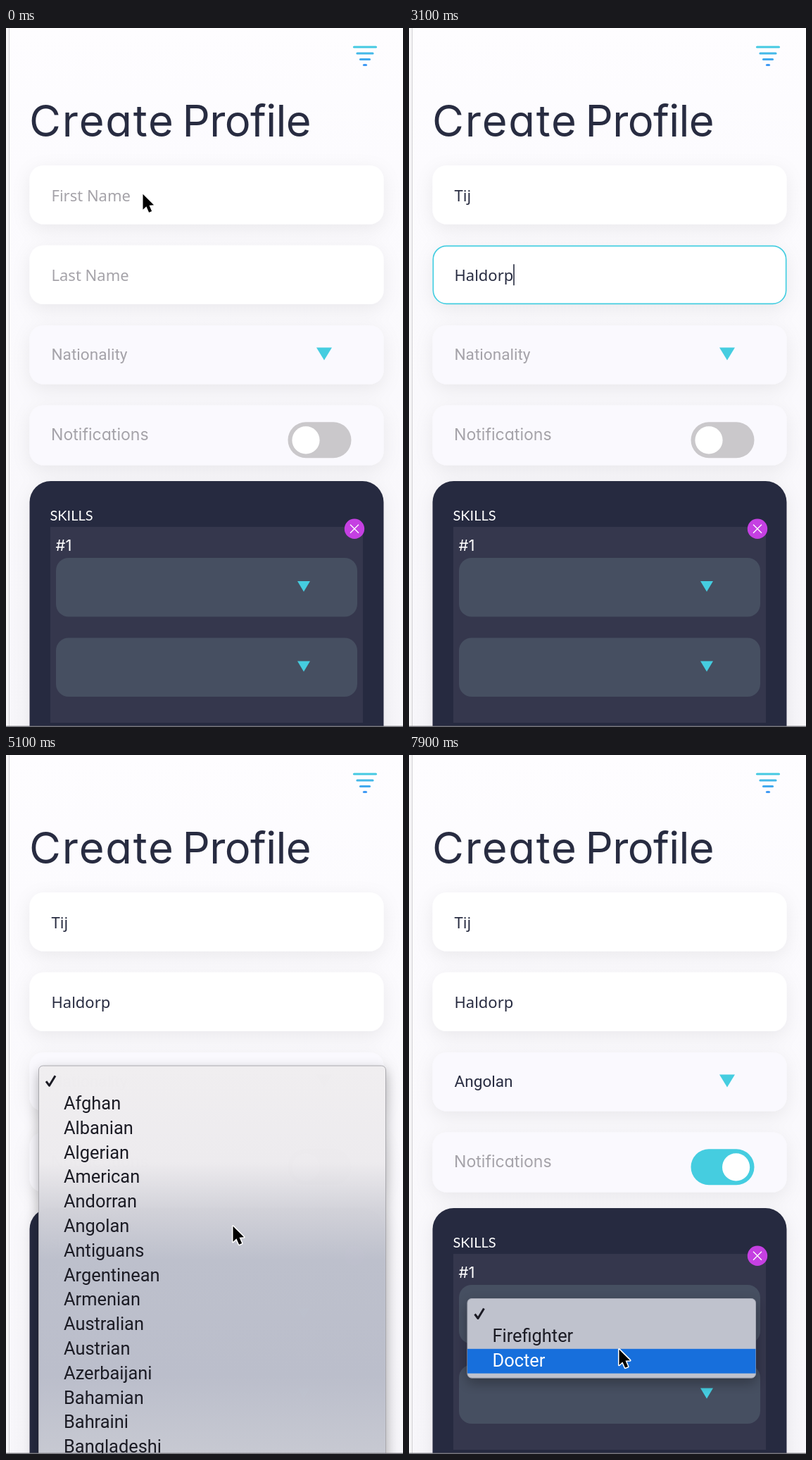
These frames come from a looping animation (564x992 px, 8 s). An HTML page:

```html
<!DOCTYPE html>
<html lang="en">
<head>
<meta charset="utf-8">
<title>Create Profile</title>
<style>
html, body { margin: 0; width: 100%; height: 100%; overflow: hidden; background: #fbfafd; }
svg { display: block; width: 564px; height: 992px; }
text { white-space: pre; }
.geo { font-family: Inter, sans-serif; font-feature-settings: "cv11"; font-optical-sizing: none; }
.title { font-size: 61.5px; }
.input { font: 22px "Noto Sans", sans-serif; }
.select { font: 22.6px Roboto, sans-serif; }
.popup { font: 22px Roboto, sans-serif; }
.menu { font: 25.4px Roboto, sans-serif; }
.label { font: 20px Lato, sans-serif; }
</style>
</head>
<body>
<svg id="stage" viewBox="0 0 564 992" xmlns="http://www.w3.org/2000/svg"></svg>
<script>
const LOOP = 8000, CYAN = '#45cde0', INK = '#282c41', GREY = '#a5a3a9';
const FIRST = 'Tij', LAST = 'Haldorp', NATION = 'Angolan';
const PITCH = 34.8;
const stage = document.getElementById('stage');
const $ = id => document.getElementById(id);

const rect = (x, y, w, h, r, fill, extra = '') =>
  `<rect x="${x}" y="${y}" width="${w}" height="${h}" rx="${r}" fill="${fill}" ${extra}/>`;
const text = (x, y, cls, fill, str, extra = '') =>
  `<text x="${x}" y="${y}" class="${cls}" fill="${fill}" ${extra}>${str}</text>`;
const arrow = (x, y, w, h) => `<path d="M${x} ${y}h${w}l${-w / 2} ${h}z" fill="${CYAN}"/>`;
const check = (x, y) =>
  `<path d="M${x - 6.5} ${y + 1}l4.5 6l8.5 -14" fill="none" stroke-width="3" stroke-linejoin="round"/>`;

const filterIcon = [[27, 494.5, 525.5], [36, 499, 521], [44.5, 503.5, 516.5], [52.5, 508.5, 511.5]]
  .map(([y, a, b]) => `<path d="M${a} ${y}H${b}"/>`).join('');

const fields = [[195, 83.5, '#fff'], [308.5, 83.5, '#fff'], [422, 83.5, '#faf9fe'], [535.5, 85, '#faf9fe']]
  .map(([y, h, fill]) => rect(33.5, y, 503, h, 20, fill)).join('');

const nations = ['', 'Afghan', 'Albanian', 'Algerian', 'American', 'Andorran', 'Angolan', 'Antiguans',
  'Argentinean', 'Armenian', 'Australian', 'Austrian', 'Azerbaijani', 'Bahamian', 'Bahraini', 'Bangladeshi'];
const jobs = ['', 'Firefighter', 'Docter'];

// "base" is the bottom edge of the empty first row of a menu.
function menuMarkup(id, items, x, y, w, h, base, fill, blue, edge) {
  return `<g id="${id}">
    ${rect(x, y, w, h, 6, fill, `stroke="${edge}" filter="url(#menuShadow)"`)}
    ${rect(x, 0, w, PITCH, 0, blue, 'class="bar"')}
    <g class="row">${check(x + 17, base - 15.5)}</g>
    ${items.slice(1).map((s, i) => text(x + 35.5, base + 25.3 + i * PITCH, 'menu row', '#1b1b24', s)).join('')}
  </g>`;
}

const popupMarkup = (id, y, name) => `<g id="${id}" transform="translate(0 ${y})">
  ${rect(35, 0, 560, 155, 5, '#fff', 'filter="url(#popupShadow)"')}
  <path d="M35 88.5H595V150q0 5 -5 5H40q-5 0 -5 -5z" fill="#f8f8fb"/>
  <path d="M35 88H595" stroke="#dddce0" stroke-width="1.5"/>
  ${text(55, 52, 'popup', '#1c1c20', name)}
  ${text(469, 52, 'popup', '#5f6065', FIRST + ' ' + LAST)}
  ${text(55, 130, 'popup', '#515257', 'Manage addresses...')}
</g>`;

const shadow = (id, dy, blur, alpha) =>
  `<filter id="${id}" x="-20%" y="-20%" width="140%" height="140%">
    <feDropShadow dx="0" dy="${dy}" stdDeviation="${blur}" flood-color="#000" flood-opacity="${alpha}"/></filter>`;

stage.innerHTML = `<defs>
  <linearGradient id="page" x2="0" y2="1"><stop stop-color="#fefdff"/><stop offset=".2" stop-color="#fcfbfe"/><stop offset="1" stop-color="#f7f6fa"/></linearGradient>
  <linearGradient id="icon" gradientUnits="userSpaceOnUse" x1="0" y1="25" x2="0" y2="54"><stop stop-color="${CYAN}"/><stop offset="1" stop-color="#3f97f5"/></linearGradient>
  <linearGradient id="glass" gradientUnits="userSpaceOnUse" x1="0" y1="440" x2="0" y2="992"><stop stop-color="#f0eef0"/><stop offset=".25" stop-color="#edebee"/><stop offset=".37" stop-color="#d3d3da"/><stop offset=".5" stop-color="#bec1cd"/><stop offset=".8" stop-color="#bcbfcc"/><stop offset="1" stop-color="#c8cad3"/></linearGradient>
  ${shadow('fieldShadow', 7, 13, .07)}${shadow('popupShadow', 2, 3, .3)}${shadow('menuShadow', 7, 9, .3)}
</defs>
${rect(0, 0, 564, 992, 0, 'url(#page)')}
${rect(0, 0, 4, 992, 0, '#f6f5f7')}
<path d="M4.5 0V992" stroke="#d2d1d4"/>
<g fill="none" stroke="url(#icon)" stroke-width="3.2" stroke-linecap="round">${filterIcon}</g>
${text(33, 154, 'geo title', INK, 'Create', 'letter-spacing="1.8"')}
${text(250.5, 154, 'geo title', INK, 'Profile', 'letter-spacing="-.6"')}
<g filter="url(#fieldShadow)">${fields}${rect(33.5, 643, 503, 400, 30, INK)}</g>
${rect(34.3, 0, 501.4, 82, 19, 'none', `id="focus" stroke="${CYAN}" stroke-width="1.7"`)}
<text id="first" class="input" x="64.5" y="245.5"></text>
<text id="last" class="input" x="64.5" y="359"></text>
<path id="caret" stroke="${INK}" stroke-width="1.6"/>
<text id="nation" class="select" x="64.5" y="471"></text>
${arrow(441, 453.5, 22, 18)}
${text(64, 585, 'geo', GREY, 'Notifications', 'font-size="23.1"')}
${rect(400.5, 559.3, 90, 51, 25.5, GREY, 'id="track"')}
<circle id="knob" cy="584.9" r="19.6" fill="#fff"/>
${rect(63, 708, 444, 278, 0, '#35374d')}
${text(62.5, 698.5, 'label', '#fff', 'SKILLS')}
${text(70.5, 741.5, 'geo', '#fff', '#1', 'font-size="22"')}
${[752, 865.5].map(y => rect(71, y, 428, 83.5, 18, '#464f61') + arrow(414, y + 33, 18, 15)).join('')}
<circle cx="495" cy="710.7" r="14.2" fill="#c540e2"/>
<path d="M489 704.7l12 12m0 -12l-12 12" stroke="#fff" stroke-width="1.3"/>
${popupMarkup('popup1', 311, FIRST)}
${popupMarkup('popup2', 424.5, LAST)}
${menuMarkup('nations', nations, 46.5, 441, 493, 600, 477.7, 'url(#glass)', '#4a9afb', '#a9a8ad')}
${menuMarkup('jobs', jobs, 83, 771.5, 409.5, 112.5, 808, '#bfc2cd', '#176fdc', '#a6a9b5')}
<path d="M0 991.2H564" stroke="#77777c" stroke-width="1.6"/>
<g id="pointer">
  <path id="tip" transform="translate(.5 .8) scale(.9)" d="M0 0V24.5L5.4 19.4L9.6 28.8L14 27L10 17.6L17.3 17.2Z" fill="#000" stroke="#fff" stroke-width="3.4" paint-order="stroke" stroke-linejoin="round"/>
  <circle id="touch" r="17.6" fill="#272736" fill-opacity=".95" stroke="#8a8f9b" stroke-width="3"/>
</g>`;

const path = [[0, 194, 235], [3300, 194, 235], [3900, 430, 462], [4300, 430, 462], [4500, 423, 484],
  [4850, 330, 655], [5000, 322, 668], [5350, 322, 668], [5850, 445, 585], [6250, 445, 585],
  [6800, 304, 782], [7100, 300, 790], [7400, 300, 790], [7800, 298, 842.9]];

const clamp = v => Math.max(0, Math.min(1, v));
const smooth = v => (v = clamp(v)) * v * (3 - 2 * v);
const within = (t, a, b) => t >= a && t < b;
const set = (el, attrs) => { for (const k in attrs) el.setAttribute(k, attrs[k]); };
const show = (id, on) => set($(id), { visibility: on ? 'visible' : 'hidden' });
const typed = (word, t, start, step) => word.slice(0, Math.max(0, Math.floor((t - start) / step) + 1));

function pointerAt(t) {
  const i = path.findIndex(p => p[0] > t);
  if (i < 0) return path[path.length - 1].slice(1);
  const [a, b] = [path[i - 1] || path[0], path[i]];
  const k = smooth((t - a[0]) / (b[0] - a[0]));
  return [a[1] + (b[1] - a[1]) * k, a[2] + (b[2] - a[2]) * k];
}

function highlight(id, base, row, on) {
  const menu = $(id), top = row ? base + (row - 1) * PITCH : base - 29.7;
  set(menu.querySelector('.bar'), { y: top, height: row ? PITCH : 29.7, opacity: on ? 1 : 0 });
  menu.querySelectorAll('.row').forEach((el, i) => {
    const color = on && i === row ? '#fff' : '#1b1b24';
    set(el, i ? { fill: color } : { stroke: color });
  });
}
const rowAt = (y, base) => Math.max(0, Math.floor((y - base) / PITCH) + 1);

function fill(id, value, placeholder) {
  $(id).textContent = value || placeholder;
  set($(id), { fill: value ? INK : GREY });
}

function draw(t) {
  const first = typed(FIRST, t, 1200, 200), last = typed(LAST, t, 2050, 125);
  const inLast = t >= 1900, focused = within(t, 600, 3900);
  const typingEl = $(inLast ? 'last' : 'first'), value = inLast ? last : first;
  const top = inLast ? 309.3 : 195.8;

  fill('first', first, 'First Name');
  fill('last', last, 'Last Name');
  fill('nation', t >= 5400 ? NATION : '', 'Nationality');

  show('focus', focused);
  set($('focus'), { y: top });
  show('caret', focused && (t < 3300 || t >= 3700));
  const caretX = 65.2 + (value ? typingEl.getComputedTextLength() : 0);
  set($('caret'), { d: `M${caretX} ${top + 26}v30` });

  show('popup1', within(t, 1200, 1850));
  show('popup2', within(t, 2050, 2900));

  const on = smooth((t - 6000) / 300);
  const mix = (a, b) => Math.round(a + (b - a) * on);
  set($('knob'), { cx: 426 + 38.6 * on });
  set($('track'), { fill: `rgb(${mix(202, 69)},${mix(200, 205)},${mix(203, 224)})` });

  const nationsOpen = within(t, 4200, 5310), jobsOpen = t >= 7300;
  const [x, y] = pointerAt(t);
  set($('nations'), { opacity: nationsOpen ? 1 - clamp((t - 5100) / 210) : 0 });
  highlight('nations', 477.7, rowAt(pointerAt(t - 100)[1], 477.7), t < 5080);
  set($('jobs'), { opacity: jobsOpen ? 1 : 0 });
  highlight('jobs', 808, Math.min(2, rowAt(y, 808)), true);

  const touch = within(t, 3300, 4200) || within(t, 5400, 7300);
  set($('pointer'), { transform: `translate(${x} ${y})`, opacity: within(t, 1100, 3300) ? 0 : 1 });
  set($('tip'), { opacity: touch ? 0 : 1 });
  set($('touch'), { opacity: touch ? 1 : 0 });
}

const start = performance.now();
function frame() {
  draw((performance.now() - start) % LOOP);
  requestAnimationFrame(frame);
}
frame();
</script>
</body>
</html>
```
